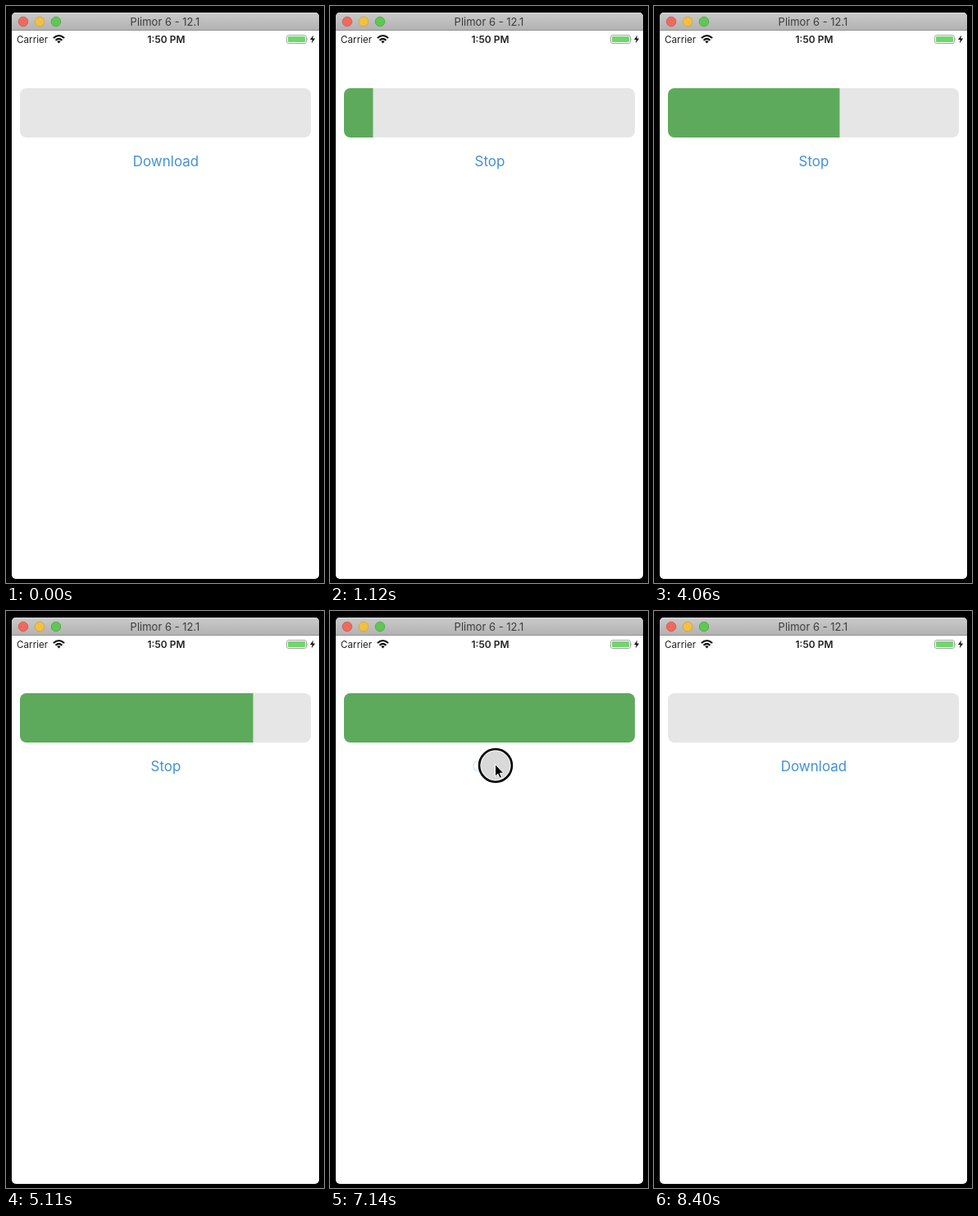
An HTML page for the animation above (8.47 s loop, 388 by 702 pixels).

```html
<!DOCTYPE html>
<html lang="en">
<head>
<meta charset="utf-8">
<title>Download button</title>
<style>
  html, body { margin: 0; width: 100%; height: 100%; overflow: hidden; background: #000; }
  svg { display: block; width: 388px; height: 702px; }
  text { font-family: Inter, Roboto, sans-serif; text-anchor: middle; fill: #222; }
  .title { font-size: 13px; fill: #3d3d3d; }
  .carrier { font-size: 11.7px; text-anchor: start; }
  .clock { font-size: 12px; font-weight: 600; }
  .label { font-size: 17px; fill: #4492d2; }

  /* One 8470 ms loop shared by every part */
  .fill, .label, .pointer, .ring { animation: 8470ms step-end infinite; }
  .fill { animation-name: fill; }
  .download { animation-name: download; }
  .stop { animation-name: stop; }
  .clear { animation-name: clear; }
  .pointer { animation-name: move; }
  .ring { animation-name: press; }

  @keyframes fill {
    0% { width: 0; }
    10.74% { width: 35.5px; }
    23.14% { width: 106.5px; }
    35.53% { width: 142.5px; }
    47.93% { width: 209.5px; }
    60.33% { width: 284.5px; }
    71.9% { width: 355px; }
    85.95%, 100% { width: 0; }
  }
  @keyframes download {
    0% { opacity: 1; }
    4.95% { opacity: .2; }
    6.61% { opacity: 0; }
    85.95%, 100% { opacity: 1; }
  }
  @keyframes stop {
    0% { opacity: 0; }
    6.61% { opacity: 1; }
    72.72%, 100% { opacity: 0; }
  }
  @keyframes clear {
    0% { opacity: 0; }
    72.72% { opacity: 1; }
    84.29% { opacity: .2; }
    85.95%, 100% { opacity: 0; }
  }
  @keyframes move {
    0% { visibility: hidden; transform: translate(2px, 300px); }
    .82% { visibility: visible; transform: translate(2px, 300px); animation-timing-function: ease-out; }
    4.13%, 6.61% { visibility: visible; transform: translate(201px, 187px); animation-timing-function: ease-in-out; }
    11.57% { visibility: visible; transform: translate(8px, 225px); }
    12.39% { visibility: hidden; transform: translate(92px, 254px); }
    77.68% { visibility: visible; transform: translate(92px, 254px); animation-timing-function: ease-out; }
    82.64%, 85.95% { visibility: visible; transform: translate(201px, 187px); animation-timing-function: ease-in-out; }
    93.38% { visibility: visible; transform: translate(0, 233px); }
    94.21%, 100% { visibility: hidden; transform: translate(0, 233px); }
  }
  @keyframes press {
    0% { opacity: 0; }
    4.95% { opacity: 1; }
    6.61% { opacity: 1; animation-timing-function: linear; }
    7.43% { opacity: 0; }
    84.29% { opacity: 1; }
    85.95% { opacity: 1; animation-timing-function: linear; }
    86.78%, 100% { opacity: 0; }
  }
</style>
</head>
<body>
<svg viewBox="0 0 388 702">
  <defs>
    <linearGradient id="chrome" x2="0" y2="1">
      <stop stop-color="#cacaca"/>
      <stop offset="1" stop-color="#b1b1b1"/>
    </linearGradient>
    <clipPath id="window"><rect x="7" y="8" width="375" height="689" rx="5"/></clipPath>
    <clipPath id="bar"><rect x="17" y="100" width="355" height="60" rx="8"/></clipPath>
  </defs>

  <g clip-path="url(#window)">
    <rect x="7" y="8" width="375" height="689" fill="#fff"/>
    <rect x="7" y="8" width="375" height="22" fill="url(#chrome)"/>
    <path d="M7 8.5H382" stroke="#dedede"/>
    <path d="M7 29.5H382" stroke="#939393"/>
  </g>
  <g stroke-width=".8">
    <circle cx="21" cy="19" r="5.8" fill="#f0695f" stroke="#d5534a"/>
    <circle cx="41" cy="19" r="5.8" fill="#f3c13f" stroke="#d6a232"/>
    <circle cx="61" cy="19" r="5.8" fill="#5fc753" stroke="#4aa93f"/>
  </g>
  <text class="title" x="194" y="24">Plimor 6 - 12.1</text>

  <!-- Status bar -->
  <text class="carrier" x="13" y="45">Carrier</text>
  <g fill="none" stroke="#111" stroke-width="2.1">
    <path d="M57.9 39.1Q64.5 32.9 71.1 39.1"/>
    <path d="M60.5 41.7Q64.5 38 68.5 41.7"/>
    <path d="M62.3 43.1Q64.5 41.4 66.7 43.1L64.5 45.6Z" fill="#111" stroke="none"/>
  </g>
  <text class="clock" x="195.5" y="45">1:50 PM</text>
  <rect x="342.5" y="35.5" width="24" height="10" rx="2.4" fill="#fff" stroke="#a3a3a3"/>
  <rect x="344" y="37" width="21" height="7" rx="1" fill="#70d66d"/>
  <path d="M367.5 38.8Q369.2 40.5 367.5 42.2Z" fill="#999"/>
  <path d="M375 35.5L371 41H373.7L372.8 45.3L377.2 39.4H374.3Z" fill="#111"/>

  <!-- Progress and button -->
  <g clip-path="url(#bar)">
    <rect x="17" y="100" width="355" height="60" fill="#e6e6e6"/>
    <rect class="fill" x="17" y="100" width="0" height="60" fill="#5eaa5c"/>
  </g>
  <text class="label download" x="195" y="195">Download</text>
  <text class="label stop" x="195" y="195">Stop</text>
  <text class="label clear" x="194.5" y="195">Clear</text>

  <g class="pointer">
    <g class="ring">
      <circle cx="1" cy="1" r="19.8" fill="#d9d9d9" stroke="#000" stroke-width="2.8"/>
      <circle cx="1" cy="1" r="18" fill="none" stroke="#f2f2f2"/>
    </g>
    <path d="M.5 -.5V14.2L3.8 11.2L6.1 16.3L8.5 15.2L6.3 10.3H10.8Z" fill="#000" stroke="#fff" stroke-width="1"/>
  </g>
</svg>
</body>
</html>
```
